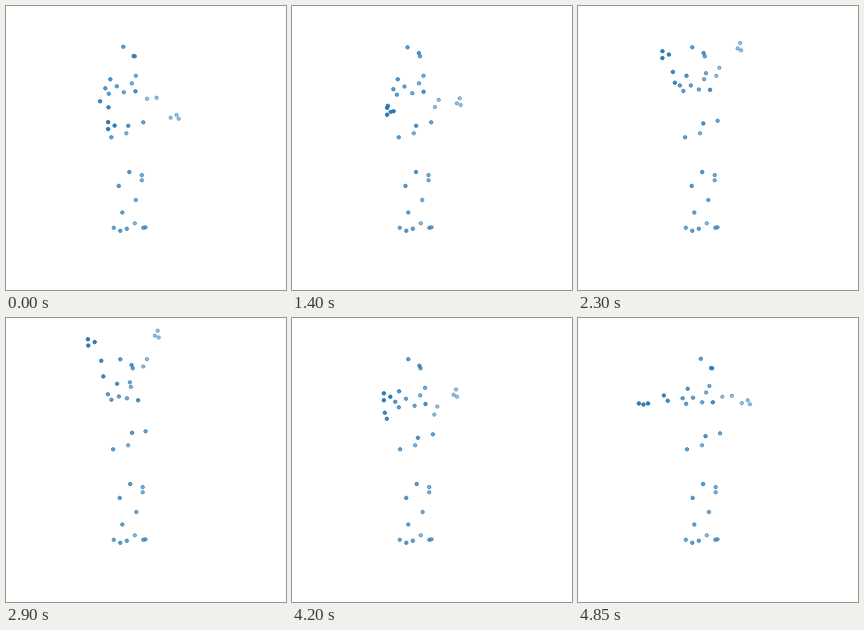
These frames come from a looping animation (280x284 px, 6.4 s). An HTML page with a canvas:

```html
<!DOCTYPE html>
<html lang="en">
<head>
<meta charset="utf-8">
<title>Motion capture markers</title>
<style>
html, body { margin: 0; width: 100%; height: 100%; overflow: hidden; background: #fff }
canvas { display: block }
</style>
</head>
<body>
<canvas id="stage" width="280" height="284"></canvas>
<script>
const ctx = document.getElementById('stage').getContext('2d');
const LOOP = 6400;

// body: lean, bob; head: crown x, nod; arms: joint centres; swing: outward arc of the next move
const pose = (start, end, body, head, elbowL, handL, elbowR, handR, swing) =>
  ({ start, end, swing, parts: { body, head, elbowL, handL, elbowR, handR } });
const poses = [
  pose(0, 0, [0, 0], [117, 1], [98, 98], [104, 119.3], [145.5, 92], [169, 110.8], 0),
  pose(650, 650, [1.5, 0], [117, 0], [99.7, 106], [107.2, 135.8], [150, 100], [156.5, 123.8], 10),
  pose(1950, 1950, [2.5, 1.5], [114, 0], [95, 100], [89.5, 82.3], [140.5, 95], [157.5, 75.5], 8),
  pose(2550, 3100, [2.6, -6], [114, 0], [96, 50.3], [84, 24], [138.8, 44.5], [150.8, 16.3], 0),
  pose(3650, 3650, [3, -2.5], [112.5, 0], [90, 75], [90.5, 47.3], [149.5, 66], [160.5, 40], 4),
  pose(4200, 4200, [4, 1.5], [116, .2], [93.5, 97.5], [93.7, 78.5], [143.5, 92.3], [163.2, 75.3], 9),
  pose(4850, LOOP, [5.3, -2], [122.5, 1], [87.5, 79.8], [65.2, 85.5], [148.8, 78], [168.2, 84.2], 0),
];

// The picture refreshes every 50 ms within these spans and rests between them.
const bursts = [[0, 200], [400, 1000], [1100, 1100], [1400, 1450], [1700, 1950], [2100, 2500],
  [2650, 2650], [2800, 2900], [3050, 3050], [3200, 3500], [3650, 3900], [4200, 4750], [4850, 4850]];

const clamp = v => Math.max(0, Math.min(1, v));

function dot(alpha, x, y) {
  ctx.globalAlpha = alpha;
  ctx.beginPath();
  ctx.arc(x + .3, y + .3, 1.75, 0, Math.PI * 2);
  ctx.fill();
  ctx.stroke();
}

function pair(alpha, [x, y], dx, dy) {
  dot(alpha, x - dx, y - dy);
  dot(alpha, x + dx, y + dy);
}

// Three markers evenly spaced on an ellipse
function hand(alpha, [x, y], degrees, rx, ry) {
  for (let i = 0; i < 3; i++) {
    const a = (degrees + i * 120) * Math.PI / 180;
    dot(alpha, x + rx * Math.cos(a), y + ry * Math.sin(a));
  }
}

function figureAt(t) {
  const i = poses.findLastIndex(p => t >= p.start);
  const from = poses[i], to = poses[i + 1] || from;
  const u = t < from.end ? 0 : clamp((t - from.end) / (to.start - from.end));
  const figure = {};
  for (const name in from.parts)
    figure[name] = from.parts[name].map((v, k) => v + (to.parts[name][k] - v) * u);
  figure.handR[0] += from.swing * Math.sin(Math.PI * u);
  return figure;
}

function draw(t) {
  const { body: [lean, bob], head: [crown, nod], elbowL, handL, elbowR, handR } = figureAt(t);
  const raise = Math.max(0, -bob) / 6;
  const low = clamp((handL[1] - elbowL[1]) / 20);
  const wide = clamp((86 - handL[0]) / 20);
  const open = clamp(low + wide);

  ctx.globalAlpha = 1;
  ctx.fillStyle = '#fff';
  ctx.fillRect(0, 0, 280, 284);
  ctx.fillStyle = ctx.strokeStyle = '#1f72ae';

  // Head
  dot(.7, crown, 41 - nod * .5);
  dot(.75, crown + 11.3 - nod, 46.8 + nod * 3);
  dot(.65, crown + 12.5 - nod, 50);

  // Shoulders and chest
  dot(.75, 104 + lean * .7 + raise * 5, 73 - raise * 7.5);
  dot(.6, 129.5 + lean * .8 - raise * 8, 69.5 - raise * 5.5);
  dot(.58, 125.5 + lean * .6 - raise * 2.5, 77 - raise * 8.5);

  // Waist
  dot(.7, 99 + lean, 82 + bob);
  dot(.68, 102.5 + lean, 87.5 + bob);
  dot(.65, 110.5 + lean * .8, 80 + bob * .3);
  dot(.62, 117.5 + lean * 1.2, 86 + bob);
  dot(.78, 129.2 + lean, 85 + bob * .5);

  // Pelvis
  dot(.75, 122 + lean * .9 + raise * 1.5, 119.5 - raise * 5);
  dot(.65, 137 + lean * .9, 116 - raise * 3);
  dot(.55, 120 + lean * .7, 127);
  dot(.68, 105 + lean * .7, 131);

  // Arms
  pair(.85, elbowL, 1 + low * 3.2, 3 + raise * 5 - wide * 2);
  hand(.92, handL, -wide * 30, 4.3 + wide, 4 - wide * 3.3);
  pair(.47, elbowR, 1.5 + open * 3.3, open * 3.5 - 4);
  hand(.45, handR, 45, 2 + open * 2.8, 4.3 - open * 2);

  // Legs
  const knee = lean * .35;
  dot(.72, 123 + knee, 165.8);
  dot(.6, 135.5 + knee, 168.8);
  dot(.57, 135.5 + knee, 174);
  dot(.72, 112.5 + knee, 179.6);
  dot(.6, 129.5 + knee * .6, 193.7);
  dot(.65, 116, 206.2);

  // Feet
  dot(.5, 128.5, 217);
  dot(.63, 107.5, 221.5);
  dot(.7, 114, 224.5);
  dot(.67, 120.5, 222.5);
  dot(.63, 137, 221.5);
  dot(.6, 139.2, 221);
}

function frame() {
  const t = performance.now() % LOOP;
  const [, end] = bursts.findLast(([start]) => t >= start);
  draw(Math.min(end, Math.floor(t / 50) * 50));
  requestAnimationFrame(frame);
}
frame();
</script>
</body>
</html>
```
